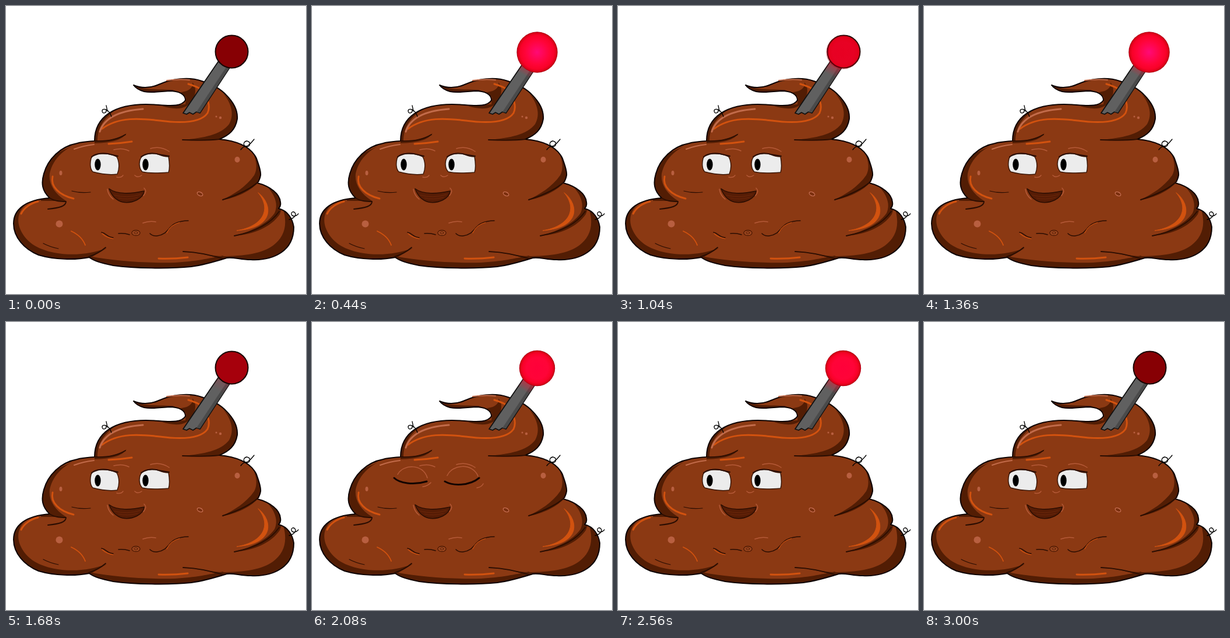
Animation of 515 by 495 pixels, one loop 3.04 s. Source, as an HTML page:

```html
<!DOCTYPE html>
<html lang="en">
<head>
<meta charset="utf-8">
<style>
html, body { margin: 0; width: 100%; height: 100%; overflow: hidden; background: #fff }
svg { display: block; width: 515px; height: 495px }
path { stroke-linecap: round; stroke-linejoin: round }
.line path { fill: none; stroke: #2a0d02; stroke-width: 1.9 }
.dark path { fill: #521d04 }
.hot path { fill: none; stroke: #d2520f; stroke-width: 3 }
.pale path { fill: none; stroke: #b55a38; stroke-width: 1.5 }
.hair path { fill: none; stroke: #000; stroke-width: 1.3 }
</style>
</head>
<body>
<svg viewBox="0 0 515 495">
  <defs>
    <path id="body" d="M219 136C231 141 246 142 262 135C284 125 314 121 336 129C352 134 368 142 378 153C391 166 398 180 397 194C394 212 384 222 366 229C399 232 421 243 430 262C434 274 438 283 437 291C436 297 435 300 431 304C454 310 470 323 471 337C472 342 470 346 468 348C484 352 492 366 494 380C494 398 487 414 472 424C457 434 438 437 420 436C402 436 390 431 379 433C360 439 340 445 318 448C280 452 220 451 184 446C165 442 152 439 143 432C118 437 83 436 56 428C31 418 13 397 13 374C13 350 33 333 75 330C62 318 60 305 65 288C72 263 94 241 122 236C133 233 142 233 152 232C152 214 159 196 177 184C199 170 229 167 262 170C286 172 302 172 308 162C308 151 296 146 280 146C264 147 250 150 237 147C229 145 222 140 219 136Z"/>
    <clipPath id="inside"><use href="#body"/></clipPath>
    <radialGradient id="glow">
      <stop id="core" offset="0"/>
      <stop offset=".6" stop-color="#ff0438"/>
      <stop offset=".83" stop-color="#f80228"/>
      <stop offset=".95" stop-color="#d80018"/>
      <stop offset="1" stop-color="#a00010"/>
    </radialGradient>
    <linearGradient id="tint" gradientUnits="userSpaceOnUse" x1="378" y1="95" x2="364" y2="119">
      <stop offset="0" stop-color="#ff1230"/>
      <stop offset="1" stop-color="#ff1230" stop-opacity="0"/>
    </linearGradient>
  </defs>

  <use href="#body" fill="#8b3913"/>
  <g clip-path="url(#inside)">
    <g class="dark">
      <path d="M50 330C25 343 17 360 23 380C32 405 53 418 83 424C115 430 147 426 173 416L143 434L100 445L5 430V330Z"/>
      <path d="M143 430C190 439 245 442 290 441C325 439 348 434 372 429L385 436L350 460H140Z"/>
      <path d="M303 422C335 425 348 429 370 430C410 430 440 425 458 412C477 398 484 378 476 350L500 350V445H390Q365 428 303 422Z"/>
      <path d="M440 303C460 319 469 340 461 356C448 375 420 388 391 395C425 393 455 380 470 358L480 330Z"/>
      <path d="M418 240C430 262 433 278 426 291C412 311 392 323 370 334C396 329 420 319 436 300L445 270Z"/>
      <path d="M366 143C387 163 393 186 383 203C369 221 340 227 303 230C330 233 375 233 392 215L402 180Z"/>
      <path d="M300 148C314 147 322 140 320 131C329 142 326 160 310 172C300 178 284 177 268 172L308 169L309 157Z"/>
      <path d="M219 136C236 145 260 143 286 144L310 154L285 148L235 150Z"/>
      <path d="M126 235C96 247 80 265 75 288C73 305 82 322 103 335L60 335L50 270Z"/>
      <path d="M152 233C170 233 190 229 207 219C199 230 183 235 152 236ZM157 232C157 212 165 196 185 181L150 185V232Z"/>
    </g>
  </g>
  <use href="#body" fill="none" stroke="#0d0300" stroke-width="2"/>

  <g class="line">
    <path d="M75 330C84 336 95 336 103 336C103 344 92 347 72 349"/>
    <path d="M152 232C174 233 192 229 205 221"/>
    <path d="M303 230C330 231 350 231 366 229"/>
    <path d="M372 333C397 325 420 315 434 301"/>
    <path d="M392 395C423 389 453 376 469 353"/>
    <path d="M142 431C154 427 164 421 171 415"/>
    <path d="M304 422C330 423 350 428 372 434"/>
    <path d="M164 389C173 391 173 397 184 398M193 391Q203 390 212 393M247 391Q252 396 260 395C277 393 278 380 290 374Q300 369 313 369" style="stroke-width:1.5"/>
    <path d="M64 408Q75 414 90 417M113 318Q128 322 145 320" style="stroke-width:1.2"/>
  </g>
  <g class="hot">
    <path d="M165 211C193 190 230 193 264 197C302 202 335 200 346 184Q350 175 347 165"/>
    <path d="M80 293C76 310 91 325 116 331"/>
    <path d="M26 357C31 347 42 339 55 336"/>
    <path d="M433 321C456 338 465 381 396 386C440 379 457 350 433 321Z" style="fill:#d2520f;stroke-width:1"/>
    <path d="M112 387C125 393 132 400 136 411" style="stroke-width:1.8"/>
    <path d="M176 237Q197 236 216 233M262 434Q286 435 312 432M313 134Q330 139 337 145"/>
    <path d="M165 391Q172 398 184 400M276 390Q282 376 298 372" style="stroke-width:1.2"/>
  </g>
  <g class="pale">
    <path d="M161 216C166 200 181 181 235 177" style="stroke:#c26b4a;stroke-width:3"/>
    <path d="M117 246Q133 240 151 238M276 128Q297 125 315 127" style="stroke:#c26b4a;stroke-width:2"/>
    <path d="M235 373Q246 369 257 371M174 315Q176 326 184 332M237 313Q243 318 236 326"/>
    <path d="M185 247Q200 243 211 249M248 245Q265 240 280 250"/>
  </g>
  <g fill="#b85f40">
    <ellipse cx="91.500" cy="374.500" rx="6" ry="6"/>
    <ellipse cx="397" cy="264" rx="4.500" ry="5"/>
    <ellipse cx="94" cy="287" rx="2.500" ry="4"/>
    <circle cx="368" cy="192" r="2.200"/><circle cx="361" cy="190" r="1.500"/>
    <ellipse cx="333" cy="323" rx="5" ry="3" transform="rotate(25 333 323)" fill="#7a2e0d" stroke="#c0694c" stroke-width="1.500"/>
  </g>
  <ellipse cx="223" cy="390" rx="7" ry="4.500" fill="#a34a20" stroke="#4a1803" stroke-width="1.300"/>
  <path d="M219 390Q223 386 227 390Q223 393 220 391" fill="none" stroke="#4a1803"/>

  <path d="M177 314C190 324 215 323 237 318C236 331 217 340 200 337C188 334 181 325 177 314Z" fill="#561c05" stroke="#2a0d02" stroke-width="1.5"/>
  <path d="M186 325Q207 331 231 324M193 330Q207 334 226 329" fill="none" stroke="#6c270a"/>

  <g id="open">
    <g fill="#ececec" stroke="#3a1606" stroke-width="1.5">
      <path d="M146 262C149 254 160 253 170 254C178 254 184 256 190 259C195 268 195 280 191 289C175 291 160 288 149 285C144 280 144 270 146 262Z"/>
      <path d="M231 262C236 253 250 252 262 255C268 258 274 259 279 259C281 270 281 280 279 286C265 287 245 288 234 285C228 279 228 268 231 262Z"/>
    </g>
    <ellipse cx="157.500" cy="272.500" rx="5.200" ry="10"/>
    <ellipse cx="239.500" cy="272.500" rx="5.200" ry="10"/>
    <g class="line">
      <path d="M147 259Q160 251 175 254L192 258M232 259Q246 250 262 255L280 258"/>
    </g>
    <g class="pale"><path d="M190 294Q197 296 201 291M221 291Q226 296 233 291"/></g>
  </g>
  <g id="shut">
    <g class="pale"><path d="M147 262C156 244 191 243 198 268M232 264C241 244 276 242 285 265M190 283Q199 282 204 276M283 285Q291 284 294 278"/></g>
    <g class="line">
      <path d="M141 268C150 277 174 281 197 274M228 274C242 282 270 282 287 268" style="stroke:#120400;stroke-width:3"/>
    </g>
  </g>

  <g class="hair">
    <path d="M181 190Q178 181 172 178C173 185 165 186 165 180C166 176 172 177 175 181M172 171L174 180"/>
    <path d="M403 247Q408 240 413 242C420 242 421 233 413 232C405 234 408 244 415 240Q421 236 426 229"/>
    <path d="M486 367Q492 366 496 361C499 355 492 351 490 356C489 362 497 363 502 357"/>
  </g>

  <path d="M364 96L386 103L333 184L327 182L321 186L315 183L310 186L304 184Z" fill="#606060" stroke="#111" stroke-width="1.8"/>
  <path d="M380 102L385 104L333 183L327 182Z" fill="#4a4a4a"/>
  <path id="warm" d="M364 96L386 103L371 126L348 120Z" fill="url(#tint)"/>
  <circle cx="387.500" cy="78.500" r="28" id="ball" stroke="#180000" stroke-width="2"/>
  <circle cx="386.500" cy="79.500" id="light" fill="url(#glow)"/>
</svg>
<script>
const LOOP = 3040, STEP = 40, PEAKS = [400, 1340, 2320], REACH = 400;
const $ = id => document.getElementById(id);
const clamp = x => Math.max(0, Math.min(1, x));
const mix = (a, b, k) => `rgb(${a.map((v, i) => Math.round(v + (b[i] - v) * k))})`;

function draw(now) {
  const t = Math.floor(now % LOOP / STEP) * STEP;
  const gap = Math.min(REACH, ...PEAKS.map(p => Math.abs(t - p)));
  const level = (1 + Math.cos(Math.PI * gap / REACH)) / 2;
  const heat = clamp((REACH - gap) / 115) ** 2;
  $('ball').setAttribute('fill', mix([135, 0, 4], [248, 0, 32], heat));
  $('core').setAttribute('stop-color', mix([255, 0, 50], [255, 10, 120], level ** 2));
  $('light').setAttribute('r', 28.3 + 7 * level);
  $('light').setAttribute('opacity', clamp((330 - gap) / 90));
  $('warm').setAttribute('opacity', heat * .85);
  const blink = t >= 1920 && t < 2280;
  $('open').style.display = blink ? 'none' : '';
  $('shut').style.display = blink ? '' : 'none';
}

const start = performance.now();
function tick() {
  draw(performance.now() - start);
  requestAnimationFrame(tick);
}
tick();
</script>
</body>
</html>
```
